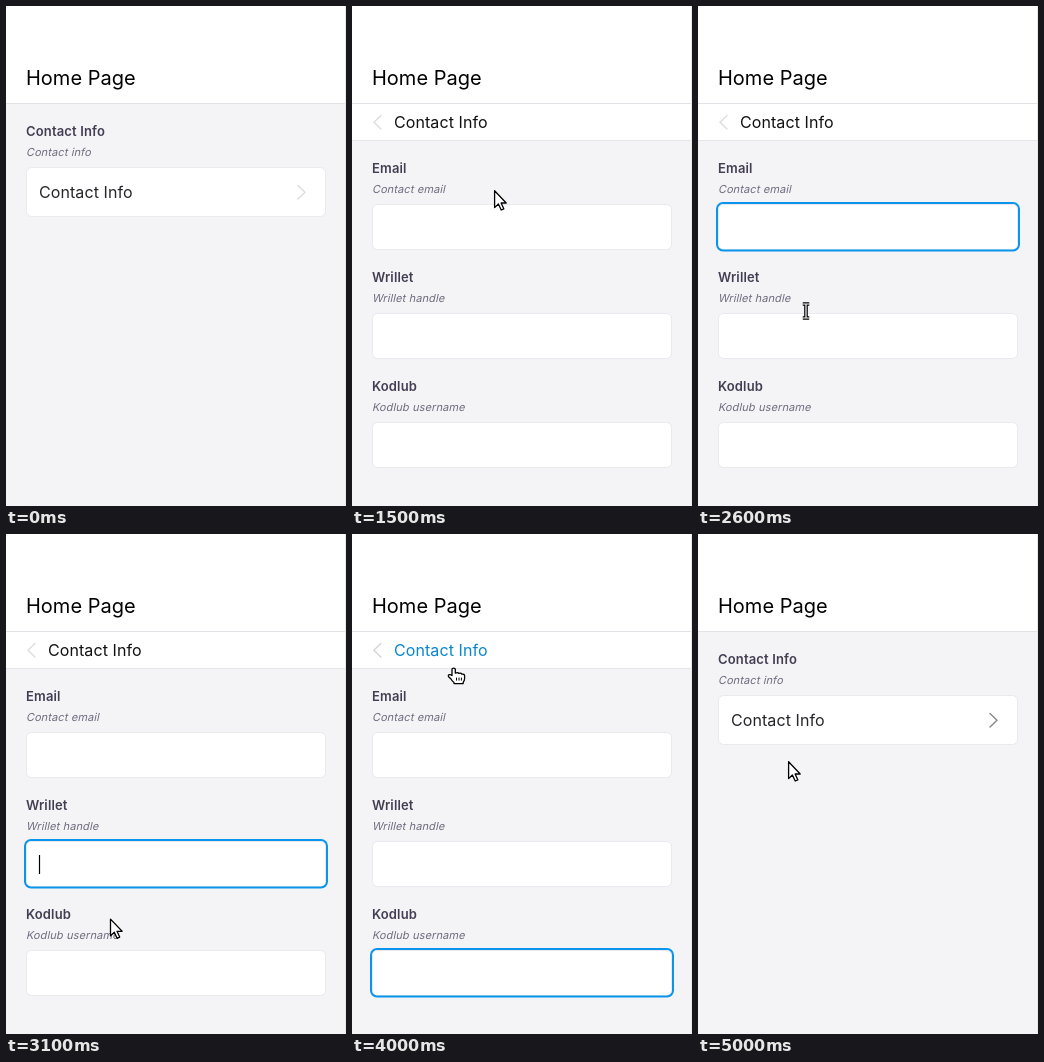
Animation of 340 by 500 pixels, one loop 5.1 s. Source, as an HTML page:

```html
<!DOCTYPE html>
<html lang="en">
<head>
<meta charset="utf-8">
<title>Contact form</title>
<style>
  html, body { margin: 0; width: 100%; height: 100%; overflow: hidden; background: #f4f4f6; }
  svg { display: block; width: 340px; height: 500px; font-family: Inter, sans-serif; }
  .label { font-size: 13px; font-weight: 600; letter-spacing: .15px; fill: #433e52; }
  .hint { font-size: 11px; letter-spacing: .13px; fill: #716c7f; }
  .row { font-size: 16px; letter-spacing: .08px; }
  .box { fill: #fff; stroke: #e9e9ee; }
  .chevron { fill: none; stroke: #333; stroke-width: 1.4; stroke-linecap: round; stroke-linejoin: round; }
  .ring { fill: none; stroke: #0a95ec; stroke-width: 2; }
  .pointer { fill: #fff; stroke: #000; stroke-width: 1.3; stroke-linejoin: round; }
</style>
</head>
<body>
<svg viewBox="0 0 340 500">
  <rect width="340" height="500" fill="#f4f4f6"/>
  <text class="label" x="20" y="130">Contact Info</text>
  <text class="hint" transform="translate(20 150) skewX(-12)">Contact info</text>
  <rect class="box" x="20.5" y="161.5" width="299" height="49" rx="5"/>
  <text id="cardText" class="row" x="33" y="192">Contact Info</text>
  <path id="cardArrow" class="chevron" d="M292 179.5L299 186.2L292 193"/>

  <g id="panel">
    <rect y="98" width="340" height="402" fill="#f4f4f6"/>
    <rect y="98" width="340" height="36" fill="#fff"/>
    <path d="M0 134.5H340" stroke="#e6e6ea"/>
    <text id="backText" class="row" x="42" y="122">Contact Info</text>
    <path id="backArrow" class="chevron" d="M29 109.5L22 116.2L29 123"/>
    <g id="fields"></g>
  </g>

  <rect width="340" height="97" fill="#fff"/>
  <path d="M0 97.5H340" stroke="#e2e2e7"/>
  <text x="20" y="79" font-size="20">Home Page</text>
  <path d="M339.5 0V500" stroke="#e9e9ec"/>

  <g id="cursor">
    <path id="arrow" class="pointer" d="M.6 .8V17.6L4.4 14L7.2 20L9.8 18.8L7.1 13H12.2Z"/>
    <g id="hand" class="pointer">
      <path d="M-2 7.5V1.3Q-2 0-.4 0T1.3 1.3V5Q4 4 4.7 5.3Q7 4.6 7.8 6Q10.6 5.6 10.6 8V10.5Q10.6 12.5 9.2 14V15.5H0V14.5Q-2 13-3 11L-5.4 8.6Q-6.2 7.2-4.8 6.6Q-3.4 6.2-2 7.5Z"/>
      <path d="M2.5 9.5V12.5M5 9.5V12.5M7.4 9.5V12.5" stroke-width="1"/>
    </g>
    <g id="beam" fill="none">
      <path d="M-3.2-7H3.2M0-7V7M-3.2 7H3.2" stroke="#000" stroke-width="3.6"/>
      <path d="M-3.2-7H3.2M0-7V7M-3.2 7H3.2" stroke="#fff" stroke-width="1.2"/>
    </g>
  </g>
</svg>
<script>
const LOOP = 5100, STEP = 100, BLUE = '#0a86d1';
const OPEN = 1150, CLOSE = 4650, SLIDE = 150;
const GAP = 109, BLINK = 600, FADE = 200;
const $ = id => document.getElementById(id);
const clamp = v => Math.max(0, Math.min(1, v));
const within = (v, a, b) => v >= a && v < b;
const show = (el, on) => el.setAttribute('visibility', on ? 'visible' : 'hidden');
const easeOut = k => 1 - (1 - k) ** 2;
const smooth = k => k * k * (3 - 2 * k);

const fields = [
  { name: 'Email', hint: 'Contact email', click: 1800 },
  { name: 'Wrillet', hint: 'Wrillet handle', click: 2750 },
  { name: 'Kodlub', hint: 'Kodlub username', click: 3350 }
];

$('fields').innerHTML = fields.map((f, i) => `
  <g transform="translate(0 ${i * GAP})">
    <text class="label" x="20" y="167">${f.name}</text>
    <text class="hint" transform="translate(20 187) skewX(-12)">${f.hint}</text>
    <rect class="box" x="20.5" y="198.5" width="299" height="45" rx="5"/>
    <rect class="ring" id="ring${i}" x="19" y="197" width="302" height="47.5" rx="6"/>
    <path id="caret${i}" d="M33.5 212V231" stroke="#000" stroke-width="1.2"/>
  </g>`).join('');

// where the cursor rests or turns: time, x, y
const stops = [
  [500, 120, 70], [800, 137, 204], [1000, 133.5, 173], [1500, 142, 184],
  [1700, 142, 216], [2100, 139, 220], [2600, 108, 305], [3400, 102, 421],
  [3600, 102, 421], [4150, 102, 70], [4400, 98, 106], [4600, 97, 108], [5000, 90, 227]
];

function cursorAt(t) {
  const i = stops.findIndex(s => s[0] >= t);
  if (t < stops[0][0] || i < 0) return null;
  const b = stops[i], a = stops[i - 1] || b;
  const k = a === b ? 1 : smooth((t - a[0]) / (b[0] - a[0]));
  return [1, 2].map(n => a[n] + (b[n] - a[n]) * k);
}

// what lies under the cursor
function targetAt(t) {
  const pos = cursorAt(t);
  if (!pos) return '';
  const y = pos[1];
  if (!within(t, OPEN, CLOSE)) return within(y, 161, 211) ? 'card' : 'page';
  if (within(y, 98, 135)) return 'back';
  return fields.some((f, i) => within(y - i * GAP, 195, 244)) ? 'field' : 'page';
}

// share of the last FADE ms spent over a target
function glow(t, name, n = 20) {
  let hits = 0;
  for (let i = 0; i < n; i++) hits += targetAt(t - i * FADE / n) === name;
  return hits / n;
}

function draw(t) {
  const out = 1 - easeOut(clamp((t - OPEN) / SLIDE)) + easeOut(clamp((t - CLOSE) / SLIDE));
  $('panel').setAttribute('transform', `translate(${340 * out} 0)`);
  show($('panel'), out < 1);

  const over = targetAt(t);
  for (const [name, ink] of [['card', '#26262a'], ['back', '#111']]) {
    $(name + 'Text').setAttribute('fill', over === name ? BLUE : ink);
    $(name + 'Arrow').setAttribute('opacity', 0.17 + 0.83 * glow(t, name));
  }
  $('backArrow').setAttribute('transform', `translate(${-3 * glow(t, 'back')} 0)`);

  fields.forEach((f, i) => {
    const end = i + 1 < fields.length ? fields[i + 1].click : LOOP;
    const focused = out < 1 && within(t, f.click, end);
    show($('ring' + i), focused);
    show($('caret' + i), focused && (t - f.click) % (2 * BLINK) < BLINK);
  });

  show($('arrow'), over === 'page');
  show($('hand'), over === 'card' || over === 'back');
  show($('beam'), over === 'field');
  if (over) $('cursor').setAttribute('transform', `translate(${cursorAt(t)})`);
}

const start = performance.now();
function tick() {
  const t = (performance.now() - start) % LOOP;
  draw(Math.floor(t / STEP) * STEP);
  requestAnimationFrame(tick);
}
tick();
</script>
</body>
</html>
```
